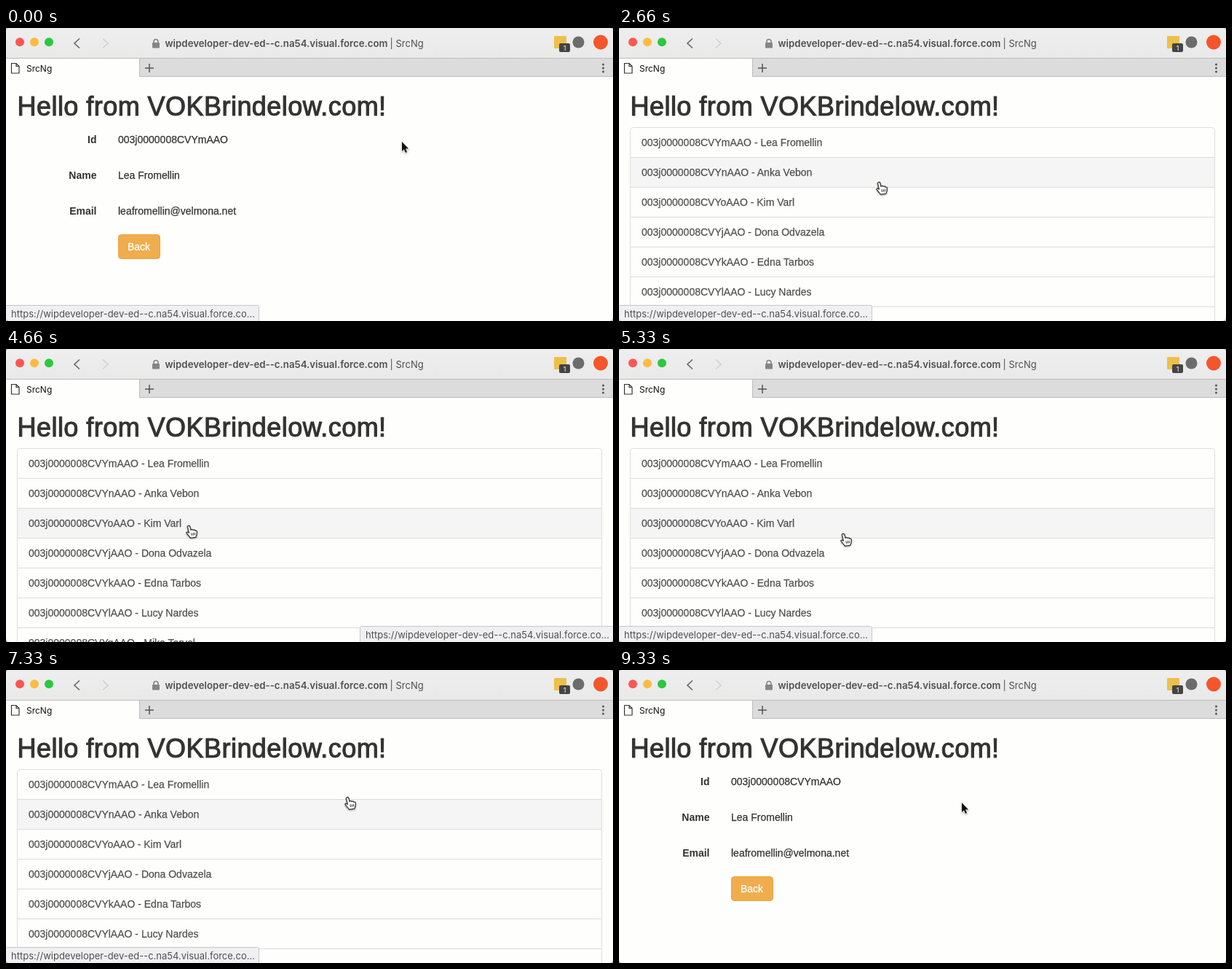
Animation of 834 by 402 pixels, one loop 9500 ms. Source, as an HTML page:

```html
<!DOCTYPE html>
<html lang="en">
<head>
<meta charset="utf-8">
<title>SrcNg</title>
<style>
  html, body { margin: 0; width: 100%; height: 100%; overflow: hidden; background: #c2c2c2; }
  svg { display: block; width: 834px; height: 402px; border-radius: 5px; }
  text { white-space: pre; }
  .ui { font-family: Inter, sans-serif; font-size: 13px; fill: #505050; }
  .page { font-family: "Liberation Sans", Arial, sans-serif; font-size: 14px; fill: #333; }
  .page .title { font-size: 36px; letter-spacing: .46px; stroke: #333; stroke-width: 1.1px; }
  .label { font-weight: 700; text-anchor: end; }
  .value { stroke: #333; stroke-width: .25px; }
  .row rect { fill: #fefefd; }
  .row.on rect { fill: #f5f5f5; }
  .row text { fill: #505050; stroke: #505050; stroke-width: .25px; }
  .line { fill: none; stroke: #ddd; }
  .button rect { fill: #f0ad4e; stroke: #eea236; }
  .button.on rect { fill: #ec971f; stroke: #d58512; }
  .button text { fill: #fff; stroke: #fff; stroke-width: .25px; }
  #cursor { filter: drop-shadow(0 1px 1px rgba(0, 0, 0, .35)); }
</style>
</head>
<body>
<svg viewBox="0 0 834 402">
  <rect width="834" height="402" fill="#fefefd"/>

  <g class="page">
    <text class="title" x="15.500" y="120">Hello from VOKBrindelow.com!</text>
    <g id="list"></g>
    <g id="detail">
      <text class="label" x="124.500" y="158">Id</text>
      <text class="label" x="124.500" y="207">Name</text>
      <text class="label" x="124.500" y="256">Email</text>
      <text class="value" x="154" y="158"></text>
      <text class="value" x="154" y="207"></text>
      <text class="value" x="154" y="256"></text>
      <g id="back" class="button">
        <rect x="154.500" y="283.500" width="57" height="33" rx="4"/>
        <text x="167" y="305">Back</text>
      </g>
    </g>
  </g>

  <g class="ui">
    <defs>
      <linearGradient id="bar" x2="0" y2="1">
        <stop stop-color="#eeeeee"/><stop offset="1" stop-color="#e9e9e9"/>
      </linearGradient>
    </defs>
    <rect width="834" height="41" fill="url(#bar)"/>
    <rect y="41" width="834" height="26" fill="#dcdcdc"/>
    <path d="M0 41.500H834M183.500 41V66.500H834" fill="none" stroke="#bcbcbc"/>
    <rect y="42" width="183" height="26" fill="#fefefd"/>
    <circle cx="19" cy="19.200" r="6" fill="#fc5753"/>
    <circle cx="39" cy="19.200" r="6" fill="#fdbc40"/>
    <circle cx="59" cy="19.200" r="6" fill="#2bc840"/>
    <g fill="none" stroke-width="1.600">
      <path d="M101 14.500L94 21L101 27.500" stroke="#656565"/>
      <path d="M133 14.500L140 21L133 27.500" stroke="#d0d0d0"/>
      <path d="M203 21V18.500a3 3 0 0 1 6 0V21" stroke="#858585"/>
    </g>
    <rect x="201" y="20" width="10" height="7.500" rx="1" fill="#858585"/>
    <text x="218.500" y="26" style="font-weight:600;font-size:13.25px">wipdeveloper-dev-ed--c.na54.visual.force.com</text>
    <text x="527.500" y="26">| SrcNg</text>
    <rect x="753" y="11" width="17" height="17" rx="1" fill="#edc04b"/>
    <rect x="760" y="21" width="15" height="12" rx="2" fill="#444"/>
    <text x="767.500" y="30.500" text-anchor="middle" style="fill:#fff;font-size:9px">1</text>
    <circle cx="786.500" cy="19.500" r="8" fill="#6c6c6c"/>
    <circle cx="817" cy="19.500" r="10" fill="#f4552b"/>
    <path d="M7.500 48.500H14L18 52.500V62H7.500ZM14 48.500V52.500H18" fill="#fff" stroke="#333" stroke-width="1.200"/>
    <text x="28" y="60" style="fill:#111;font-size:12px">SrcNg</text>
    <path d="M191 55H203M197 49V61" stroke="#555" stroke-width="1.500"/>
    <path d="M820.500 50v.01M820.500 55v.01M820.500 60v.01" stroke="#555" stroke-width="3" stroke-linecap="round"/>
    <g id="status">
      <rect x="-.500" y="380.500" width="348" height="26" rx="2" fill="#f0f0f2" stroke="#c6c6c9"/>
      <text x="7" y="397">https://wipdeveloper-dev-ed--c.na54.visual.force.co...</text>
    </g>
  </g>

  <g id="cursor">
    <path id="arrow" transform="scale(.93)" d="M0 0V14L3.100 11.200L5.300 16.200L7.600 15.200L5.400 10.300H9.700Z" fill="#111" stroke="#fff" stroke-width="1.500" paint-order="stroke"/>
    <g id="hand" fill="#fff" stroke="#333" stroke-width="1.300" stroke-linejoin="round">
      <path d="M-2.600 2.200C-2.800 .2 .3 -.1 .9 1.800L2 6.300C3 5.200 4.600 5.400 5 6.600C6.200 5.700 7.600 6.200 7.900 7.300C9.300 6.800 10.500 7.600 10.400 9C10.400 12 9.800 14.300 8.800 16.300L1.600 17.400C-.3 14.600 -2.900 12.700 -4 10.300C-4.100 8.700 -2.200 8.600 -.7 10.200Z"/>
      <path d="M2.800 10.500L3.500 14M5 10.200L5.600 13.700M7.100 10L7.600 13.300" fill="none" stroke-width="1"/>
    </g>
  </g>
</svg>

<script>
const LOOP = 9500, ROW = 41, LIST_TOP = 136;
const $ = id => document.getElementById(id);

const people = [
  ["m", "Lea Fromellin", "leafromellin@velmona.net"],
  ["n", "Anka Vebon", "a_vebon@rovakeson.com"],
  ["o", "Kim Varl", "varl_kim@dovenholts.com"],
  ["j", "Dona Odvazela"],
  ["k", "Edna Tarbos"],
  ["l", "Lucy Nardes"],
  ["q", "Mika Torvel"]
].map(([key, name, email]) => ({ id: `003j0000008CVY${key}AAO`, name, email }));

// time, view, cursor, x, y, status side, hovered row (if any)
// A view is "list", "empty" or the index of the person shown.
const steps = [
  [0, 0, "arrow", 544, 156, "left"],
  [330, 0, "arrow", 506, 184, "left"],
  [500, 0, "arrow", 430, 226, "left"],
  [660, 0, "arrow", 336, 266, ""],
  [830, 0, "arrow", 252, 293, ""],
  [1000, 0, "hand", 208, 303, ""],
  [1160, 0, "hand", 200, 303, "right"],
  [1330, 0, "hand", 198, 303, "right"],
  [1500, "empty", "hand", 198, 303, "right"],
  [1660, "empty", "arrow", 194, 305, "right"],
  [1830, "list", "hand", 200, 302, "right", 4],
  [2000, "list", "hand", 232, 280, "right", 3],
  [2160, "list", "hand", 282, 249, "", 2],
  [2330, "list", "hand", 326, 225, "", 2],
  [2500, "list", "hand", 349, 214, "left", 1],
  [2660, "list", "hand", 358, 211, "left", 1],
  [3160, "empty", "hand", 358, 211, "left"],
  [3330, 1, "arrow", 355, 212, "left"],
  [3660, 1, "arrow", 312, 245, "left"],
  [3830, 1, "arrow", 234, 290, ""],
  [4000, 1, "hand", 198, 302, "right"],
  [4160, "empty", "arrow", 195, 303, "right"],
  [4330, "list", "hand", 200, 301, "right", 4],
  [4500, "list", "hand", 220, 272, "right", 3],
  [4660, "list", "hand", 252, 242, "right", 2],
  [4830, "list", "hand", 282, 234, "", 2],
  [5000, "list", "hand", 299, 243, "", 2],
  [5160, "list", "hand", 306, 250, "left", 2],
  [5330, "list", "hand", 309, 253, "left", 2],
  [5660, "empty", "hand", 309, 253, "left"],
  [5830, 2, "arrow", 306, 254, "left"],
  [6160, 2, "arrow", 272, 272, "left"],
  [6330, 2, "arrow", 220, 295, ""],
  [6500, 2, "hand", 198, 302, "right"],
  [6660, "empty", "arrow", 195, 303, "right"],
  [6830, "list", "hand", 222, 294, "right", 4],
  [7000, "list", "hand", 318, 250, "right", 2],
  [7160, "list", "hand", 424, 202, "right", 1],
  [7330, "list", "hand", 470, 174, "left", 1],
  [7500, "list", "hand", 474, 152, "left", 0],
  [8160, "empty", "hand", 474, 152, "left"],
  [8330, 0, "arrow", 475, 169, "left"],
  [9330, 0, "arrow", 471, 182, ""]
];

$("list").innerHTML = people.map((p, i) => {
  const y = LIST_TOP + i * ROW;
  return `<g class="row"><rect x="16" y="${y + 1}" width="802" height="${ROW}"/>` +
    `<text x="31" y="${y + 26}">${p.id} - ${p.name}</text></g>`;
}).join("") + people.slice(1).map((p, i) =>
  `<path class="line" d="M16 ${LIST_TOP + (i + 1) * ROW + .5}H818"/>`).join("") +
  `<rect class="line" x="15.500" y="${LIST_TOP + .5}" width="803" height="300" rx="4"/>`;

const rows = document.querySelectorAll(".row");
const values = document.querySelectorAll(".value");
const show = (id, on) => { $(id).style.display = on ? "" : "none"; };

function draw([, view, cursor, x, y, side, hover = -1]) {
  const person = people[view];
  show("list", view === "list");
  show("detail", person);
  if (person) [person.id, person.name, person.email].forEach((v, i) => { values[i].textContent = v; });
  rows.forEach((row, i) => row.classList.toggle("on", i === hover));
  $("back").classList.toggle("on", cursor === "hand");
  show("status", side);
  $("status").setAttribute("transform", `translate(${side === "right" ? 487 : 0})`);
  show("arrow", cursor === "arrow");
  show("hand", cursor === "hand");
  $("cursor").setAttribute("transform", `translate(${x} ${y})`);
}

let current;
function tick() {
  const t = performance.now() % LOOP;
  const step = steps.findLast(s => s[0] <= t);
  if (step !== current) draw(current = step);
  requestAnimationFrame(tick);
}
tick();
</script>
</body>
</html>
```
